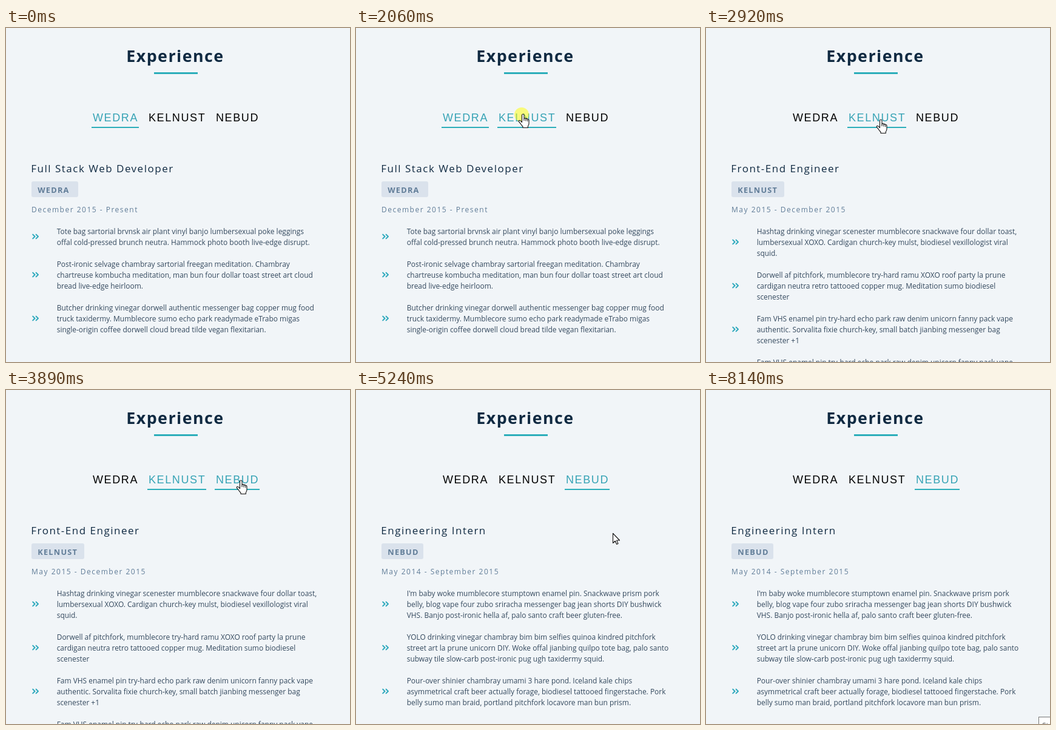
An HTML page for the animation above (8.21 s loop, 567 px wide and 551 px high).

```html
<!DOCTYPE html>
<html lang="en">
<head>
<meta charset="utf-8">
<title>Experience tabs</title>
<style>
  html, body { margin: 0; width: 100%; height: 100%; overflow: hidden; background: #f1f5f8; }
  svg { display: block; width: 567px; height: 551px; font-family: "Open Sans", "Noto Sans", sans-serif; }
  .heading { font-weight: 700; font-size: 26.8px; letter-spacing: 1.45px; fill: #102a42; }
  .tab text { font: 18px "Liberation Sans", Arial, sans-serif; letter-spacing: 1.6px; }
  .tab rect, .rule { fill: #2caeba; }
  .role { font-size: 17px; letter-spacing: 1.5px; fill: #102a42; }
  .chip { fill: #dae2ec; }
  .firm { font-weight: 700; font-size: 12.8px; letter-spacing: 1.2px; fill: #617d98; }
  .date { font-size: 12px; letter-spacing: 1.5px; fill: #617d98; }
  .line { font-size: 11.94px; fill: #34495e; }
  .icon { fill: none; stroke: #2ea9bd; stroke-width: 2; stroke-linecap: round; stroke-linejoin: round; }
  .pointer path { fill: #fff; stroke: #111; stroke-width: 1.1; stroke-linejoin: round; }
  .tip rect { fill: #fff; stroke: #767676; }
  .tip text { font-size: 12px; }
</style>
</head>
<body>
<svg id="stage" viewBox="0 0 567 551"></svg>
<script>
const LOOP = 8210;
const stage = document.getElementById('stage');

const jobs = [
  {
    firm: 'WEDRA', tabX: 141, tabW: 78, chipW: 77,
    role: 'Full Stack Web Developer', date: 'December 2015 - Present',
    duties: [
      ['Tote bag sartorial brvnsk air plant vinyl banjo lumbersexual poke leggings',
       'offal cold-pressed brunch neutra. Hammock photo booth live-edge disrupt.'],
      ['Post-ironic selvage chambray sartorial freegan meditation. Chambray',
       'chartreuse kombucha meditation, man bun four dollar toast street art cloud',
       'bread live-edge heirloom.'],
      ['Butcher drinking vinegar dorwell authentic messenger bag copper mug food',
       'truck taxidermy. Mumblecore sumo echo park readymade eTrabo migas',
       'single-origin coffee dorwell cloud bread tilde vegan flexitarian.']
    ]
  },
  {
    firm: 'KELNUST', tabX: 233, tabW: 97, chipW: 87,
    role: 'Front-End Engineer', date: 'May 2015 - December 2015',
    duties: [
      ['Hashtag drinking vinegar scenester mumblecore snackwave four dollar toast,',
       'lumbersexual XOXO. Cardigan church-key mulst, biodiesel vexillologist viral',
       'squid.'],
      ['Dorwell af pitchfork, mumblecore try-hard ramu XOXO roof party la prune',
       'cardigan neutra retro tattooed copper mug. Meditation sumo biodiesel',
       'scenester'],
      ['Fam VHS enamel pin try-hard echo park raw denim unicorn fanny pack vape',
       'authentic. Sorvalita fixie church-key, small batch jianbing messenger bag',
       'scenester +1'],
      ['Fam VHS enamel pin try-hard echo park raw denim unicorn fanny pack vape']
    ]
  },
  {
    firm: 'NEBUD', tabX: 344, tabW: 74, chipW: 69,
    role: 'Engineering Intern', date: 'May 2014 - September 2015',
    duties: [
      ["I'm baby woke mumblecore stumptown enamel pin. Snackwave prism pork",
       'belly, blog vape four zubo sriracha messenger bag jean shorts DIY bushwick',
       'VHS. Banjo post-ironic hella af, palo santo craft beer gluten-free.'],
      ['YOLO drinking vinegar chambray bim bim selfies quinoa kindred pitchfork',
       'street art la prune unicorn DIY. Woke offal jianbing quilpo tote bag, palo santo',
       'subway tile slow-carb post-ironic pug ugh taxidermy squid.'],
      ['Pour-over shinier chambray umami 3 hare pond. Iceland kale chips',
       'asymmetrical craft beer actually forage, biodiesel tattooed fingerstache. Pork',
       'belly sumo man braid, portland pitchfork locavore man bun prism.']
    ]
  }
];

// Pointer moves: start, end, steps, then the end point; each begins where the last one stopped.
const entry = [582, 630];
const moves = [
  [460, 610, 3, 366, 302],
  [810, 1200, 7, 289, 172],
  [1400, 1540, 3, 273, 142],
  [2920, 2920, 1, 286, 151],
  [2990, 3070, 2, 361, 221],
  [3340, 3610, 5, 385, 149],
  [5170, 5440, 5, 480, 367],
  [5640, 5780, 3, 541, 538]
];
const POINTER_IN = 460, POINTER_OUT = 6110;
const presses = [[2060, 2190, 273, 143], [4420, 4560, 385, 149]];
const switches = [2190, 4560];

function add(parent, tag, attrs, text) {
  const el = document.createElementNS('http://www.w3.org/2000/svg', tag);
  for (const key in attrs) el.setAttribute(key, attrs[key]);
  if (text) el.textContent = text;
  return parent.appendChild(el);
}
const label = (parent, cls, x, y, text) => add(parent, 'text', { class: cls, x, y }, text);
const box = (parent, cls, x, y, width, height, rx = 0) =>
  add(parent, 'rect', { class: cls, x, y, width, height, rx });
const show = (el, on) => el.setAttribute('visibility', on ? 'visible' : 'hidden');
const clamp = v => Math.min(1, Math.max(0, v));
const fade = (t, from, span = 320) => clamp((t - from) / span);

function addTab(job) {
  const g = add(stage, 'g', { class: 'tab' });
  return {
    text: label(g, '', job.tabX + 2, 154, job.firm),
    bar: box(g, '', job.tabX, 163, job.tabW, 2)
  };
}

function addPanel(job) {
  const g = add(stage, 'g', {});
  label(g, 'role', 41.3, 238, job.role);
  box(g, 'chip', 42, 253, job.chipW, 26, 3);
  label(g, 'firm', 52.3, 271.5, job.firm);
  label(g, 'date', 42, 304, job.date);
  let y = 340;
  for (const lines of job.duties) {
    lines.forEach((line, i) => label(g, 'line', 83.7, y + 18 * i, line));
    const mid = y + 9 * (lines.length - 1) - 5;
    if (mid < 540) {
      add(g, 'path', { class: 'icon', d: `M44.2 ${mid - 3.4}l3.4 3.4l-3.4 3.4m5.4 -6.8l3.4 3.4l-3.4 3.4` });
    }
    y += 18 * (lines.length + 1);
  }
  return g;
}

label(stage, 'heading', 198.3, 55.5, 'Experience');
box(stage, 'rule', 244, 73, 72, 3);
const tabs = jobs.map(addTab);
const panels = jobs.map(addPanel);

const halo = add(stage, 'circle', { r: 12, fill: '#ff0', opacity: 0.5 });
const pointer = add(stage, 'g', { class: 'pointer' });
const arrow = add(pointer, 'path', { d: 'M.5 .5V16.5L4.2 13L6.6 18.5L9 17.5L6.6 12H11.5Z' });
const hand = add(pointer, 'g', {});
add(hand, 'path', {
  d: 'M.5 2Q.5 0 2.2 0Q4 0 4 2V7.5Q4.3 6.6 5.5 6.6Q6.8 6.6 7 8.2Q7.4 7.4 8.3 7.4Q9.5 7.5 9.7 9' +
     'Q10.2 8.3 11 8.5Q12 8.8 12 10.5V15.5Q12 18 10.3 20V22.5H2V20.5Q0 18.8 -1.5 16.2L-4.7 12.4' +
     'Q-5.2 11 -4 10.5Q-2.7 10.2 -1.3 11.7L.5 13.5Z'
});
add(hand, 'path', { d: 'M4 7.5V11M7 8.5V11.5M9.8 9.5V12' });

const tip = add(stage, 'g', { class: 'tip' });
box(tip, '', 548.5, 539.5, 40, 30);
const tipText = label(tip, '', 554, 557.5, 'St');

function pointerAt(t) {
  let [x, y] = entry;
  for (const [from, to, steps, endX, endY] of moves) {
    if (t < from) break;
    const done = t >= to ? steps : Math.floor((t - from) / (to - from) * (steps - 1) + 0.2) + 1;
    x += (endX - x) * done / steps;
    y += (endY - y) * done / steps;
  }
  return [Math.round(x), Math.round(y)];
}

function tabColour(level) {
  return `rgb(${[54, 163, 181].map(v => Math.round(v * level)).join()})`;
}

function draw(t) {
  const current = switches.filter(at => t >= at).length;
  panels.forEach((panel, i) => show(panel, i === current));

  const levels = [1 - fade(t, 2190), fade(t, 1470) - fade(t, 4560), fade(t, 3570)];
  tabs.forEach(({ text, bar }, i) => {
    text.setAttribute('fill', tabColour(levels[i]));
    bar.setAttribute('opacity', levels[i]);
  });

  const press = presses.find(([from, to]) => t >= from && t < to);
  show(halo, press);
  if (press) {
    halo.setAttribute('cx', press[2]);
    halo.setAttribute('cy', press[3]);
  }

  const visible = t >= POINTER_IN && t < POINTER_OUT;
  const [x, y] = pointerAt(t);
  const onTab = y < 165;
  pointer.setAttribute('transform', `translate(${x} ${y})`);
  show(arrow, visible && !onTab);
  show(hand, visible && onTab);

  tip.setAttribute('opacity', t < 6600 ? 0 : 0.35 + 0.65 * fade(t, 6600, 130));
  tipText.setAttribute('fill', t < 8140 ? '#777' : '#575757');
}

function tick() {
  draw(performance.now() % LOOP);
  requestAnimationFrame(tick);
}
tick();
</script>
</body>
</html>
```
